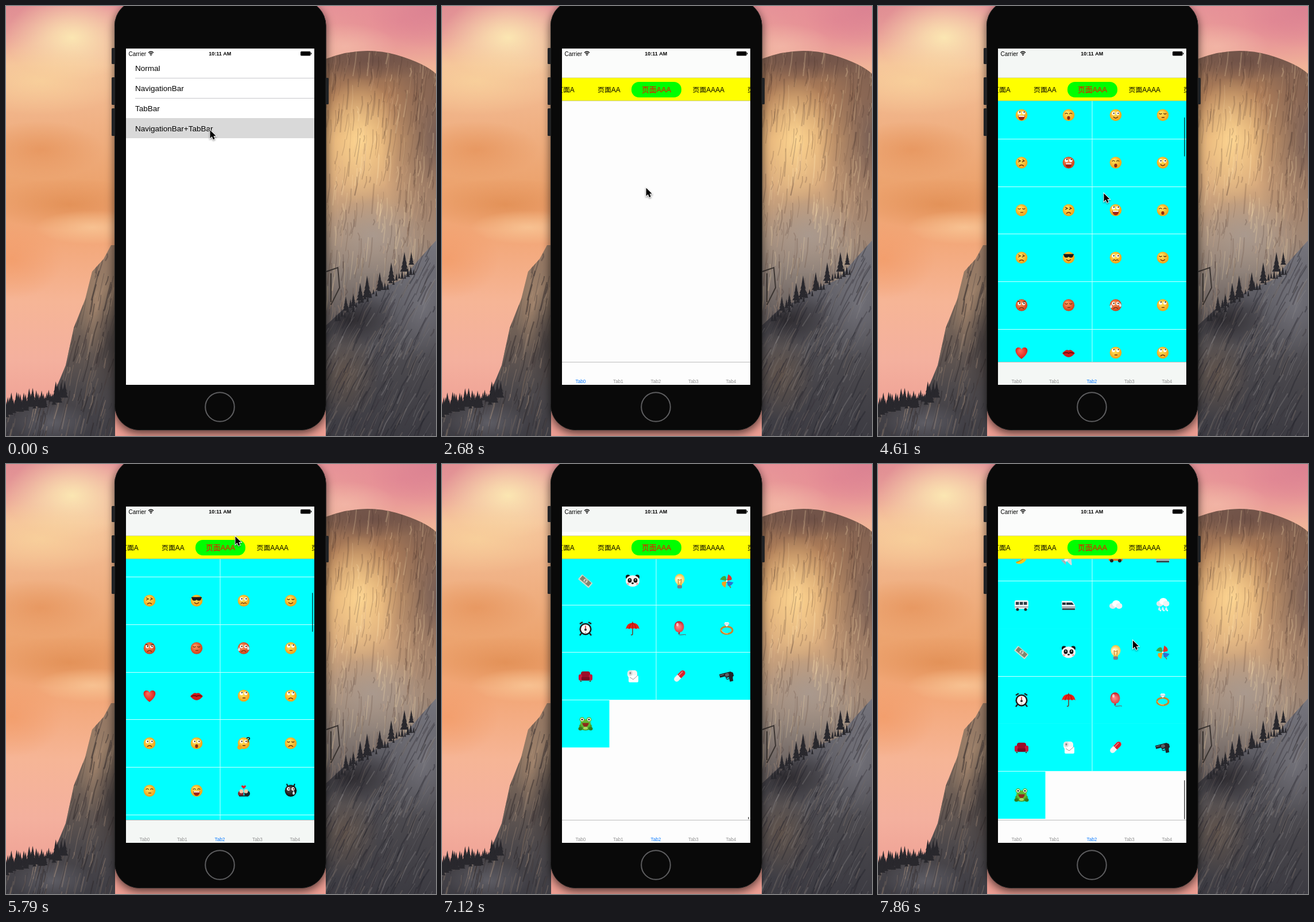
Recreate the animation shown at these times as an HTML page with a canvas. Size 749x748 px, loop 8 s.

```html
<!DOCTYPE html>
<html lang="en">
<head>
<meta charset="utf-8">
<title>Paged emoji grid</title>
<style>
html, body { margin: 0; width: 100%; height: 100%; overflow: hidden; background: #000 }
canvas { display: block }
</style>
</head>
<body>
<canvas id="stage" width="749" height="748"></canvas>
<script>
const stage = document.getElementById('stage');
let g = stage.getContext('2d');
const SANS = '"Liberation Sans", "Noto Sans CJK SC", "Noto Sans CJK", sans-serif';
const LOOP = 8000, STEP = 148.3;
const ROW = 82.65, CELL = 82, LAST = 35, TOP = 165, BOTTOM = 619.5, END = 2523.75;

// ---- drawing helpers
const fill = (c, d) => { g.fillStyle = c; g.fill(new Path2D(d)); };
const line = (c, w, d) => { g.strokeStyle = c; g.lineWidth = w; g.stroke(new Path2D(d)); };
const rect = (c, x, y, w, h) => { g.fillStyle = c; g.fillRect(x, y, w, h); };
const box = (c, x, y, w, h, r) => { g.fillStyle = c; g.beginPath(); g.roundRect(x, y, w, h, r); g.fill(); };
const dot = (c, x, y, rx, ry = rx) => { g.fillStyle = c; g.beginPath(); g.ellipse(x, y, rx, ry, 0, 0, 7); g.fill(); };
const text = (s, x, y, size, c = '#000', align = 'left', weight = '') => {
  g.font = `${weight} ${size}px ${SANS}`; g.textAlign = align; g.fillStyle = c; g.fillText(s, x, y);
};
const at = (x, y, draw, turn = 0) => { g.save(); g.translate(x, y); g.rotate(turn); draw(); g.restore(); };
const ball = (a, b) => {
  const s = g.createRadialGradient(-3, -4, 1, 0, 0, 12);
  s.addColorStop(0, a); s.addColorStop(1, b); return s;
};
let seed = 7;
const rnd = () => (seed = (seed * 16807) % 2147483647) / 2147483647;

// ---- backdrop
const shade = (y0, y1, ...colors) => {
  const s = g.createLinearGradient(0, y0, 0, y1);
  colors.forEach((c, i) => s.addColorStop(i / (colors.length - 1), c));
  return s;
};
function glow(c, x, y, rx, ry) {
  g.save(); g.translate(x, y); g.scale(rx, ry);
  const s = g.createRadialGradient(0, 0, 0, 0, 0, 1);
  s.addColorStop(0, c); s.addColorStop(1, c.slice(0, 7) + '00');
  rect(s, -1, -1, 2, 2); g.restore();
}
function rock(d, paint, area, n, lean, colors, lights) {
  const [x, y, w, h] = area;
  g.save(); g.clip(new Path2D(d));
  rect(paint, x, y, w, h);
  lights.forEach(l => glow(...l));
  for (let i = 0; i < n; i++) {
    const px = x + rnd() * w, py = y + rnd() * h, len = 10 + rnd() * 45;
    line(colors[i % colors.length], .6 + rnd() * 2, `M${px} ${py}l${lean * len * .5 + rnd() * 4} ${len * .45}l${lean * len * .3 - rnd() * 4} ${len * .55}`);
  }
  g.restore();
}
function tree(x, y, h) {
  for (let i = 0; i < 4; i++) {
    const t = y - h + i * h / 5, w = h * (.07 + i * .05);
    fill('#29282d', `M${x} ${t}l${w} ${h * .4}h${-2 * w}z`);
  }
}
function backdrop() {
  rect(shade(0, 720, '#e7969b', '#f4c09a', '#f0b184', '#eca36e', '#f3a87a', '#f6b596', '#f4b09e', '#ee9e93'), 0, 0, 749, 748);
  glow('#e08f93ff', 0, 0, 110, 75);
  glow('#fbe6b2ff', 115, 55, 115, 75);
  glow('#f9d39ccc', 60, 130, 150, 60);
  glow('#e08d52cc', 110, 345, 150, 45);
  glow('#e6945ccc', 60, 250, 110, 50);
  glow('#f9c898cc', 150, 385, 100, 30);
  glow('#f29a66bb', 10, 440, 90, 70);
  glow('#e58c95ff', 690, 25, 230, 110);
  glow('#d67c90aa', 740, 5, 110, 70);
  glow('#f3b8a8cc', 590, 70, 90, 40);

  rock('M557 92Q620 68 680 85Q730 100 749 118V560H557Z',
    shade(78, 540, '#77594d', '#b28059', '#dda771', '#d6a87c', '#b1947c', '#8d8078', '#625b5b'), [557, 70, 192, 490], 520, -.12,
    ['#3c2c2838', '#ffe3b138', '#5b403438', '#d8b08d30'],
    [['#ffd893ee', 615, 235, 70, 110], ['#66514fdd', 749, 230, 95, 210], ['#6a4d45cc', 640, 95, 120, 35], ['#a99c94bb', 640, 400, 90, 70]]);
  rock('M557 556L585 530 610 517 650 492 690 476 720 440 749 408V748H557Z',
    shade(410, 748, '#77767e', '#58575e', '#49474c', '#3c3b42'), [557, 400, 192, 348], 420, -.6,
    ['#22222860', '#9a959644', '#37343a66', '#73696466'],
    [['#2b282cee', 600, 545, 85, 50], ['#81808899', 725, 520, 65, 100], ['#6c5a4caa', 590, 640, 60, 80]]);
  for (let i = 0; i < 28; i++) tree(575 + i * 5, 540 - i * 3.1 + rnd() * 12, 9 + rnd() * 9);
  [[592, 530, 25], [605, 522, 22], [617, 512, 30], [629, 507, 38], [651, 494, 31], [671, 478, 32], [694, 462, 34], [706, 450, 22]].forEach(t => tree(...t));
  line('#3b3532', 2, 'M558 462L578 455 581 490 566 520M566 465V515');

  rock('M190 416H183L170 440 150 462 138 510 118 560 104 625 82 678 40 692 0 700V748H190Z',
    shade(416, 748, '#9a7b66', '#86705f', '#6a5c54', '#4c484b', '#3e3d44'), [0, 410, 190, 338], 420, -.3,
    ['#26222466', '#c3a48b44', '#443b3a66', '#8c786a44'],
    [['#b08e72aa', 160, 520, 35, 90], ['#3a3638cc', 180, 590, 30, 100], ['#65646ccc', 80, 725, 70, 35]]);
  for (let i = 0; i < 34; i++) tree(i * 3.1, 706 - i * .9 + rnd() * 12, 14 + rnd() * 20);

  g.shadowColor = '#000a'; g.shadowBlur = 16; g.shadowOffsetY = 5;
  box('#090909', 189, -10, 368.5, 748, 44);
  g.shadowColor = 'transparent';
  [[73, 28], [124, 48], [178, 48]].forEach(([y, h]) => box('#202225', 184, y, 6, h, 1.5));
  box('#202225', 556, 125, 6, 46, 1.5);
  g.strokeStyle = '#242424'; g.lineWidth = 1;
  g.beginPath(); g.roundRect(189.5, -9.5, 367.5, 747, 44); g.stroke();
  box('#090909', 190, -9, 366.5, 746, 43);
  g.strokeStyle = '#5d5d5f'; g.lineWidth = 2;
  g.beginPath(); g.arc(372.5, 697.5, 25.3, 0, 7); g.stroke();
}

// ---- emoji, drawn around 0,0
const eyeShapes = {
  o: x => { dot('#fff', x, -3, 2.7, 3); dot('#432', x + .6, -3.2, 1.2); },
  u: x => { dot('#fff', x, -4, 2.8, 3); dot('#432', x + .8, -5.4, 1.2); },
  n: x => line('#5a3009', 1.3, `M${x - 2.5} -2q2.5 -3 5 0`),
  v: x => line('#5a3009', 1.3, `M${x - 2.5} -3q2.5 2.5 5 0`),
  x: x => line('#5a3009', 1.3, `M${x - 2} -5l${x < 0 ? 4 : 3} 2l-4 2`),
  a: x => { eyeShapes.o(x); line('#5a2009', 1.5, x < 0 ? 'M-7 -7l5 2' : 'M7 -7l-5 2'); },
  g: x => { box('#181818', x - 4.2, -6, 8.4, 6, [1, 1, 4, 4]); rect('#181818', -9, -6, 18, 1.5); }
};
const mouths = {
  s: 'M-4 3q4 4.5 8 0', f: 'M-4 6q4 -4 8 0', z: 'M-5 5l2.5 -1.5 2.5 1.5 2.5 -1.5 2.5 1.5', '-': 'M-2 4h5'
};
function face(eyes, mouth, red) {
  dot(red ? ball('#ff9a5c', '#c93414') : ball('#ffe763', '#f0980c'), 0, 0, 10.3);
  [-3.8, 3.8].forEach(eyeShapes[eyes]);
  if (mouth === 'o') dot('#8a2c12', 0, 5, 2.6, 3.2);
  else if (mouth === 'w') { fill('#a02314', 'M-6 1H6Q5 9 0 9T-6 1Z'); rect('#fff', -5, 1, 10, 2); }
  else line('#70320c', 1.4, mouths[mouth]);
}
const drop = (x, y) => fill('#c9f1ff', `M${x} ${y}q4 6 0 7q-4 -1 0 -7z`);
const faces = [
  () => face('x', 'f'), () => face('g', 's'), () => face('o', 'z'), () => face('v', 's'),
  () => face('a', 'f', 1), () => face('v', '-', 1), () => { face('o', 'f', 1); drop(8, -4); drop(-8, -2); }, () => face('u', '-'),
  () => fill(ball('#ff6a55', '#d5150f'), 'M0 11C-16 -1 -10 -10 -5 -9Q-1 -9 0 -5Q1 -9 5 -9C10 -10 16 -1 0 11Z'),
  () => { fill('#d01a1a', 'M-11 1Q-4 -7 0 -4Q4 -7 11 1Q0 15 -11 1Z'); line('#5c0808', 1.5, 'M-9 1Q-3 -1 0 1Q3 -1 9 1'); },
  () => face('u', '-'), () => face('u', 'f'),
  () => face('o', 'f'), () => face('o', 'o'),
  () => { face('o', '-'); text('?', 8, -2, 13, '#111', 'center', 'bold'); dot('#f0a81c', -7, 7, 4); }, () => face('v', 'f'),
  () => face('n', '-'), () => face('n', 'w'),
  () => {
    dot('#8a2630', -5, 5, 5); dot('#15262b', 6, 5, 5); dot('#f3c9a8', -4, 1, 3.5); dot('#f3c9a8', 4, 1, 3.5);
    fill('#e3202c', 'M0 -3l-4 -4q0 -4 4 -1q4 -3 4 1z'); rect('#222', -8, 8, 16, 2);
  },
  () => { line('#111', 2, 'M-5 -7l-2 -5M5 -7l2 -5'); dot(ball('#555', '#050505'), 0, 0, 10.3); eyeShapes.o(-4); eyeShapes.o(4); drop(5, 0); }
];
const train = () => {
  fill('#e9eef0', 'M-12 -7H5Q10 -4 12 4V6H-12Z'); fill('#26333c', 'M-11 -4H6L9 0H-11Z');
  rect('#fff', -5, -4, 1, 4); rect('#8b989f', -12, 3, 24, 2); rect('#3d444a', -11, 6, 22, 3);
};
const cloud = () => { dot('#dfe8ec', -5, 2, 6, 5); dot('#fff', 1, -2, 7, 6); dot('#eef3f5', 6, 2, 5.5, 5); };
const things = [
  () => { dot(ball('#ffe763', '#f0980c'), 0, 0, 10); line('#fff', 3, 'M-4 2L4 8M4 2L-4 8'); },
  () => { dot('#f6efe8', 0, 0, 10); dot('#d43c2c', 0, 3, 3); dot('#222', -4, -2, 1.5); dot('#222', 4, -2, 1.5); line('#222', 1.3, 'M-4 6q4 3 8 0'); },
  () => text('囍', 0, 8, 22, '#d01818', 'center', 'bold'),
  () => { at(0, 0, () => rect('#f0801c', -5, -5, 10, 10), .78); line('#d84a18', 2, 'M0 6v6M-6 0h12'); },

  () => { line('#7a3a18', 1.6, 'M-3 -8L12 -10'); dot(ball('#ff5a3c', '#b81408'), -1, 0, 10, 8); line('#8a1008', 1, 'M-1 -8v16M-6 -6q-3 6 0 12M4 -6q3 6 0 12'); line('#e0a020', 2.5, 'M-4 8v3M2 8v3'); },
  () => { box('#2f9a3c', -9, -11, 18, 23, 4); box('#f7f7f2', -8, -11, 16, 20, 3); text('發', 0, 4, 12, '#1e8a34', 'center', 'bold'); },
  () => { line('#111', 6, 'M-2 -2L10 10'); dot(ball('#888', '#111'), -5, -6, 6); line('#aaa', 1, 'M-4 1L2 -5'); },
  () => { box('#f79022', -11, -8, 22, 19, 2); rect('#fbb03b', -11, -8, 22, 7); line('#b85a10', 1.4, 'M-5 -5v-5h10v5'); rect('#d36c14', -11, 0, 22, 1.5); },

  () => { box('#f6f6f6', -12, -8, 24, 17, 1); line('#a9a9a9', 1.1, 'M-12 -8L0 3 12 -8M-12 9L-3 0M12 9L3 0'); },
  () => { dot('#8d6a3c', 0, 1, 12); dot('#d8ab6c', 0, -.5, 11.5); line('#7a2c1c', 1, 'M8 -1A8 8 0 1 1 -8 -1A8 8 0 1 1 8 -1'); text('帅', 0, 4, 12, '#8a2c18', 'center', 'bold'); },
  () => { fill('#7a4ab8', 'M-11 11L-5 -2 3 6Z'); ['#e33c5a', '#2c6ce0', '#8a3cc0', '#1e4ab0', '#f0c020'].forEach((c, i) => { for (let j = 0; j < 4; j++) dot(c, -6 + (i * 7 + j * 5) % 17, -10 + (i * 3 + j * 7) % 17, 1.6); }); },
  () => { box('#c41212', -9, -3, 18, 14, 3); dot('#f04a30', 0, -3, 9, 3); line('#333', 1, 'M0 -3v-3'); dot('#ffb020', 0, -8, 2, 4); },

  () => { for (let i = 0; i < 4; i++) at(0, 0, () => line('#191919', 2.6, 'M3 -10Q2 -3 10 -3'), i * Math.PI / 2 + .15); },
  () => { line('#eee', 2, 'M4 4L11 12'); dot('#d91c28', -1, -2, 10); [7, 3.5].forEach(r => line('#fff', 1.8, `M${r - 1} -2A${r} ${r} 0 1 1 -1 ${-2 - r}`)); },
  () => at(0, 0, () => { box('#f6f4f4', -6, -4, 12, 16, 3); rect('#f3b0b8', -6, -6, 12, 4); dot('#f29a2c', 0, -9, 3, 5); line('#aaa', 1, 'M-5 1h4M-5 5h4'); }, .7),
  () => { line('#4a9a3c', 2, 'M-5 -10H12'); dot('#f0c67c', 0, -1, 10, 4); fill('#e8e4d8', 'M-11 -1H11Q9 10 0 10T-11 -1Z'); line('#d8442c', 1.5, 'M-9 3Q0 7 9 3'); line('#c47820', 1.4, 'M-6 -2q3 -6 5 0q3 -6 5 0'); },

  () => { fill('#f9c81c', 'M7 -12Q15 4 0 11Q-9 13 -10 8Q4 5 5 -10Z'); line('#a8780c', 1, 'M7 -11Q11 3 -9 9'); },
  () => at(0, 0, () => { fill('#d4dadd', 'M-2 -4L-13 5V7L13 7V5L2 -4Z'); box('#f5f7f8', -2.5, -14, 5, 27, 2.5); fill('#a7b0b5', 'M-2 9L-6 13H6L2 9Z'); }, .78),
  () => { fill('#ec6b16', 'M-12 2Q-8 -1 -7 -5Q-5 -9 0 -9Q5 -9 7 -3Q12 -1 12 2V6H-12Z'); fill('#dff0f4', 'M-6 -1Q-5 -7 -1 -7V-1ZM1 -7Q4 -7 5 -1H1Z'); dot('#222', -7, 6, 3); dot('#222', 7, 6, 3); },
  train,

  () => { box('#eef1f2', -12, -8, 24, 15, 3); for (let x = -10; x < 10; x += 7) rect('#2e3b44', x, -5, 5.5, 5); rect('#8a969c', -12, 3, 24, 1.5); dot('#222', -7, 8, 2.5); dot('#222', 7, 8, 2.5); },
  train,
  cloud,
  () => { at(0, -4, cloud); [-6, 0, 6].forEach(x => { drop(x, 3); dot('#f4fcff', x + 2, 10, 1.3); }); },

  () => at(0, 0, () => { box('#d8d8c8', -12, -5, 24, 11, 1); rect('#7d8670', -10, -4, 20, 8); dot('#e7e7d5', 0, 0, 3.5); text('$', 0, 3, 8, '#444', 'center'); }, .7),
  () => { [-8, 8].forEach(x => dot('#161616', x, -7, 4)); dot('#f4f4f2', 0, 0, 12, 10); [-5, 5].forEach(x => { dot('#161616', x, -1, 3.4, 4); dot('#fff', x, -2, 1); }); dot('#161616', 0, 4, 2, 1.4); dot('#f5a8a8', -8, 5, 2); dot('#f5a8a8', 8, 5, 2); },
  () => { dot(ball('#fffbd8', '#f6c13a'), 0, -3, 8.5, 9.5); rect('#f6c13a', -4, 5, 8, 3); box('#75808a', -4, 7, 8, 6, 2); line('#c06a10', 1, 'M-2 5L-3 -3 0 -1 3 -3 2 5'); },
  () => { line('#9a6a30', 1.5, 'M0 0L7 12'); ['#e0342c', '#2c70d0', '#f0a020', '#3ca844'].forEach((c, i) => at(0, 0, () => fill(c, 'M0 0L-1 -12Q9 -9 7 -4Z'), i * 1.57 + .3)); dot('#fff', 0, 0, 1.5); },

  () => { line('#222', 2.5, 'M-7 8l-3 4M7 8l3 4M-10 -8l5 -3M10 -8l-5 -3'); dot('#1b1b1b', 0, 1, 10.5); dot('#f5f5f3', 0, 1, 8); line('#c22', 1.5, 'M0 2V-5'); dot('#333', 0, 2, 2); dot('#888', 0, 7, .8); },
  () => { line('#7a2c14', 1.4, 'M0 0V9q0 3 -3 2'); fill('#e52418', 'M-12 1Q-10 -10 0 -10T12 1Q9 -2 6 1Q3 -2 0 1Q-3 -2 -6 1Q-9 -2 -12 1Z'); line('#a81008', 1, 'M0 -12V0M-6 0Q-5 -7 0 -10Q5 -7 6 0'); },
  () => { line('#7a4a4a', 1, 'M0 7q-4 5 3 4t8 0'); dot(ball('#ff8a8a', '#c81c24'), -1, -3, 8.5, 10); dot('#ffffff99', -4, -7, 2, 3); fill('#b8141c', 'M-1 6l-2 3h4z'); },
  () => { g.strokeStyle = '#c9852c'; g.lineWidth = 3; g.beginPath(); g.ellipse(0, 3, 10, 6.5, 0, 0, 7); g.stroke(); line('#f5cf80', 1, 'M-10 2Q-6 9 2 9'); fill('#f2fbff', 'M-5 -8l2 -3h6l2 3 -5 5z'); line('#8ab', .8, 'M-5 -8H5L0 -3Z'); },

  () => { box('#9c0c28', -8, -8, 16, 12, 4); box('#c4183c', -12, -3, 6, 11, 3); box('#c4183c', 6, -3, 6, 11, 3); box('#7c0820', -7, 2, 14, 6, 1); rect('#441', -9, 8, 2, 2); rect('#441', 7, 8, 2, 2); },
  () => { box('#f4f4f2', -9, -10, 17, 13, 5); box('#fff', -7, -1, 17, 12, 2); dot('#ddd', -4, -5, 4, 5); dot('#888', -4, -5, 1.5, 2); line('#999', 1, 'M-5 2L1 6 9 -1'); },
  () => at(0, 0, () => { box('#f3f3f3', -4.5, -12, 9, 24, 4.5); box('#d8202c', -4.5, -12, 9, 13, [4.5, 4.5, 0, 0]); rect('#ffffff77', -2.5, -9, 1.5, 18); }, .78),
  () => at(0, 0, () => { fill('#20262a', 'M-12 -6H8L12 -3V3Q9 2 9 11H3L3 3H-1Q-3 3 -3 0H-12Z'); dot('#596268', 1, -2, 3.5, 3); line('#7d868b', 1, 'M-11 -4H-4'); line('#20262a', 1.2, 'M-2 3q0 4 5 2'); }, -.25),

  () => {
    dot('#4a9c28', 0, 5, 11, 7); dot('#5fb832', 0, 0, 9, 7.5);
    [-6, 6].forEach(x => { dot('#5fb832', x, -7, 4.3); dot('#fff', x, -7, 2.8); dot('#222', x, -7, 1.5); });
    fill('#8c2a1c', 'M-6 -1H6Q4 6 0 6T-6 -1Z'); [-9, 9].forEach(x => dot('#2f7a1c', x, 9, 3.5, 3)); dot('#a8d860', 0, 8, 4, 2.5);
  }
];
function emoji(i) {
  if (i >= 104) things[i - 104]();
  else if (i >= 20 && i < 40) faces[i - 20]();
  else face('ouvnx'[i * 7 % 5], 'sfo-w'[i * 3 % 5], i % 9 === 4);
}

// ---- motion, in steps
const path = [
  [0, 355, 216], [1, 355, 216], [3, 348, 216], [11, 348, 216], [12, 347.5, 211], [17, 347.5, 211], [21, 378, 633],
  [24, 378, 633], [27, 388, 508], [29, 388, 508], [33, 398, 144], [35, 398, 144], [39, 399, 126], [44, 425, 520],
  [45, 426, 400], [46, 428, 235], [47, 430, 60], [48, 431, -20], [49, 433, -18], [50, 437, 55], [51, 440, 142], [53, 443.5, 307]
];
function cursorAt(k) {
  const n = path.findIndex(p => p[0] >= k);
  if (n < 0) return path.at(-1).slice(1);
  if (!n) return path[0].slice(1);
  const [a, x, y] = path[n - 1], [b, u, v] = path[n], p = (k - a) / (b - a);
  return [x + (u - x) * p, y + (v - y) * p];
}
function scrollAt(k, y) {
  if (k < 29) return 0;
  if (k <= 39) return 508 - y;
  if (k <= 44) return 382 + 1808.5 * (1 - (1 - (k - 39) / 5) ** 2);
  if (k <= 48) {
    const raw = 2190.5 + 520 - y, over = Math.max(0, raw - END);
    return raw - over * .4;
  }
  return k > 52 ? END : END + 124 * Math.exp(-.85 * (k - 48));
}

// ---- screen parts
function menu() {
  rect('#fff', 209, 74, 328, 585);
  rect('#d9d9d9', 209, 195, 328, 35);
  [125, 160].forEach(y => rect('#c8c7cc', 225, y, 312, 1));
  ['Normal', 'NavigationBar', 'TabBar', 'NavigationBar+TabBar'].forEach((s, i) => text(s, 225, 112.5 + i * 35, 13.5));
}
function grid(k, off) {
  g.save(); g.beginPath(); g.rect(209, TOP, 328, BOTTOM - TOP); g.clip();
  for (let r = Math.max(0, Math.floor(off / ROW)); r <= LAST; r++) {
    const y = TOP + r * ROW - off;
    if (y > BOTTOM) break;
    const n = r === LAST ? 1 : 4;
    rect('#0ff', 209, y, n * CELL + (n < 4 ? .5 : 0), ROW + .5);
    if (n > 1) rect('#c8ffff', 372.5, y, 1, ROW + .5);
    if (k < 53 || r % 2) rect('#d0ffff', 209, Math.round(y), 328, 1);
    for (let c = 0; c < n; c++) at(250 + c * CELL, y + 41.5, () => emoji(r * 4 + c));
  }
  if (k >= 30) {
    const p = Math.min(1, off / END), h = Math.max(4, 68 - Math.max(0, off - END));
    box('#0008', 533, 166 + p * (452 - h), 2, h, 1);
  }
  g.restore();
}
function page(k, off) {
  const full = k >= 25, tab = k >= 24 ? 2 : 0;
  rect('#fdfdfd', 209, 74, 328, 585);
  if (full) grid(k, off);
  const over = off > END + 40;
  rect(!full || k >= 53 ? '#fbfcfb' : '#f4f7f5', 209, 74, 328, over ? 44 : 51);
  if (k === 24) { rect('#f7f9f5', 209, 93, 328, 32); glow('#e9f5e9ff', 372, 112, 60, 13); }
  rect('#ff0', 209, 125, 328, 40);
  rect('#c9c9a0', 209, 124.5, 328, .8);
  rect('#b9b97c', 209, 164.5, 328, .8);
  box('#0f0', 330, 132, 87, 27, 13);
  [['A', 199], ['AA', 271], ['AAAA', 436.5], ['AAAAA', 532]].forEach(([s, x]) => text('页面' + s, x, 150, 11.9));
  text('页面AAA', 373.5, 150.2, 12.8, '#f00', 'center');
  const under = full && TOP + (LAST + 1) * ROW - off > 635;
  rect(under ? '#f4f7f5' : '#fdfdfd', 209, BOTTOM, 328, 40);
  rect('#bcbcbc', 209, 619, 328, 1);
  for (let i = 0; i < 5; i++) text('Tab' + i, 241.5 + i * 65.5, 656.3, 8.2, i === tab ? '#0a7aff' : '#929292', 'center');
}
function statusBar() {
  text('Carrier', 213.5, 86.5, 10);
  text('10:11 AM', 372.7, 86.3, 9, '#000', 'center', 'bold');
  line('#000', 1.3, 'M248 81.2Q252.5 77.2 257 81.2M249.8 83.2Q252.5 80.8 255.2 83.2');
  dot('#000', 252.5, 85, 1.2);
  box('#000', 513, 79, 17.5, 7.5, 1.5);
  box('#000', 531, 81.2, 1.3, 3, .6);
}
function cursor(x, y) {
  at(x, y, () => {
    const d = 'M.5 0V14L3.7 11 6 16.2 8.6 15.1 6.4 10.1H10.6Z';
    g.shadowColor = '#0007'; g.shadowBlur = 3; g.shadowOffsetY = 1.5;
    line('#fff', 1.8, d);
    g.shadowColor = 'transparent';
    fill('#000', d);
  });
}

const main = g, still = document.createElement('canvas');
still.width = 749; still.height = 748;
g = still.getContext('2d');
backdrop();
g = main;

function frame(now) {
  const k = Math.floor((now % LOOP + 6) / STEP);
  const [x, y] = cursorAt(k), off = scrollAt(k, y);
  g.drawImage(still, 0, 0);
  g.save(); g.beginPath(); g.rect(209, 74, 328, 585); g.clip();
  const push = k < 14 ? 0 : 1 - Math.max(0, 1 - (k - 13) / 3.5) ** 2;
  if (push < 1) at(-98 * push, 0, menu);
  if (push > 0) at(328 * (1 - push), 0, () => page(k, off));
  if (push < 1) rect('#fff', 209, 74, 328, 18);
  statusBar();
  g.restore();
  if (y > -18) cursor(x, y);
  requestAnimationFrame(frame);
}
requestAnimationFrame(frame);
</script>
</body>
</html>
```
